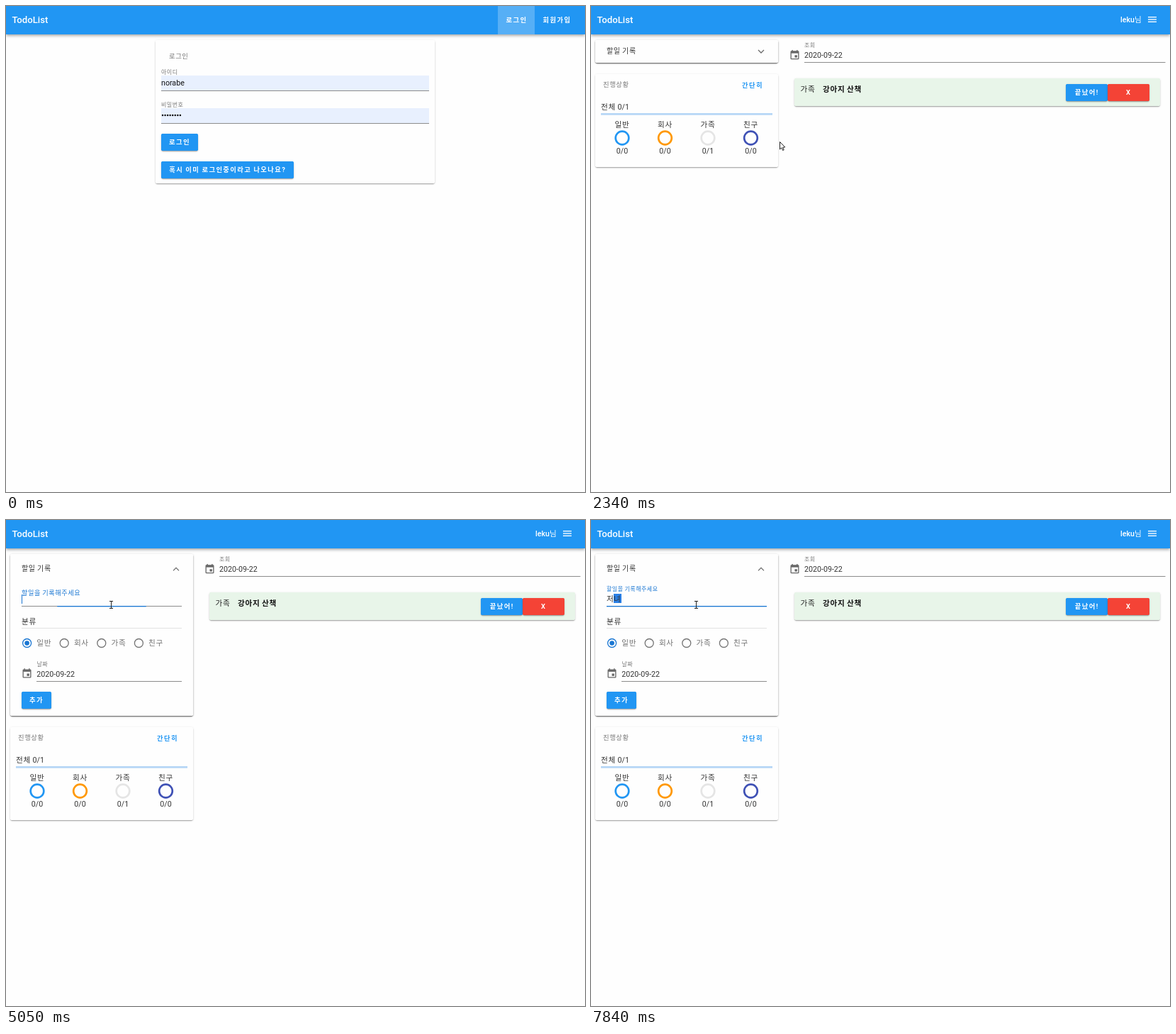
Animation, 817 px wide and 685 px high, one loop 8000 ms. Source, as an HTML page with a canvas:

```html
<!DOCTYPE html>
<html lang="ko">
<head>
<meta charset="utf-8">
<title>TodoList</title>
<style>
  html, body { margin: 0; width: 100%; height: 100%; overflow: hidden; background: #fefefe; }
  canvas { display: block; }
</style>
</head>
<body>
<canvas id="stage" width="817" height="685"></canvas>
<script>
const ctx = document.getElementById('stage').getContext('2d');
const LOOP = 8000;
const BLUE = '#2196f3', DEEP = '#1976d2', INK = '#333', GRAY = '#777', LINE = '#8c8c8c', PAPER = '#fefefe';
const BODY = 10.67, SMALL = 8, CAPTION = 9.33;

const HOME_AT = 1960, OPEN_AT = 4333, FOCUS_AT = 4980;

const pointerPath = [
  [70, 783, 672], [300, 640, 400], [500, 480, 180], [620, 400, 105], [780, 366, 172],
  [1010, 366, 172], [1250, 288, 182], [1400, 255, 188], [1800, 248, 190], [1960, 248, 190],
  [2340, 266, 191], [2500, 266, 191], [2980, 401, 294], [3140, 401, 294], [3340, 591, 262],
  [3600, 380, 180], [3780, 205, 146], [3940, 156, 134], [4250, 130, 77], [4650, 130, 77],
  [4810, 140, 98], [5000, 148, 119]
];

// time, committed text, syllable being composed
const typing = [
  [0, '', ''], [6280, 'wj', ''], [6430, 'wjs', ''], [6510, 'wjsu', ''], [6740, 'wjs', ''],
  [6900, 'wj', ''], [6980, 'w', ''], [7060, '', ''], [7300, '', 'ㅈ'], [7450, '', '저'],
  [7600, '', '전'], [7760, '저', '녀']
];

const categories = [['일반', BLUE], ['회사', '#ff9800'], ['가족', '#e5e5e5'], ['친구', '#3f51b5']];

const clamp01 = v => Math.min(1, Math.max(0, v));
const easeOut = v => 1 - (1 - clamp01(v)) ** 3;
const mix = (a, b, k) => a + (b - a) * k;

function rect(x, y, w, h, color) {
  ctx.fillStyle = color;
  ctx.fillRect(x, y, w, h);
}

function roundRect(x, y, w, h, r) {
  ctx.beginPath();
  ctx.roundRect(x, y, w, h, r);
}

const LOW = [[1, 1, -.4, .3], [1.3, 1.3, 0, .14], [.7, 3.3, 0, .12]];
const DOUBLE = [...LOW, ...LOW];
const HIGH = [[1.3, 2.7, -.7, .2], [2.7, 3.3, 0, .14], [.7, 6.7, 0, .12]];

// Filled box on whole pixels with layered shadows: [offset, blur, spread, alpha]
function surface(x, y, w, h, color = PAPER, r = 2.7, shadows = LOW) {
  const bottom = Math.round(y + h);
  y = Math.round(y);
  h = bottom - y;
  ctx.fillStyle = color;
  for (const [dy, blur, spread, alpha] of shadows) {
    ctx.save();
    ctx.shadowColor = `rgba(0,0,0,${alpha})`;
    ctx.shadowBlur = blur;
    ctx.shadowOffsetY = dy;
    roundRect(x - spread, y - spread, w + 2 * spread, h + 2 * spread, r);
    ctx.fill();
    ctx.restore();
  }
  roundRect(x, y, w, h, r);
  ctx.fill();
}

// Draws text around the vertical centre y; Hangul runs get a slightly wider pitch.
function text(str, x, y, { size = BODY, color = INK, weight = 400, track = 0, center = false } = {}) {
  ctx.font = `${weight} ${size}px Roboto, "Noto Sans CJK KR", sans-serif`;
  ctx.fillStyle = color;
  const runs = str.match(/[ㄱ-힣]+|[^ㄱ-힣]+/g) || [];
  const space = run => { ctx.letterSpacing = `${(/[ㄱ-힣]/.test(run) ? size * .06 : 0) + track}px`; };
  const widths = runs.map(run => { space(run); return ctx.measureText(run).width; });
  const total = widths.reduce((a, b) => a + b, 0);
  const baseline = Math.round(y + size * .36);
  let left = center ? x - total / 2 : x;
  runs.forEach((run, i) => {
    space(run);
    ctx.fillText(run, left, baseline);
    left += widths[i];
  });
  return total;
}

function label(str, x, y, size = SMALL, color = GRAY) {
  text(str, x, y, { size, color });
}

function buttonText(str, x, y, color = '#fff') {
  text(str, x, y, { size: CAPTION, color, weight: 700, track: .83, center: true });
}

function button(str, x, y, w, color = BLUE) {
  surface(x, y, w, 24, color);
  buttonText(str, x + w / 2, y + 12);
}

function circle(x, y, r, color, width) {
  ctx.beginPath();
  ctx.arc(x, y, r, 0, Math.PI * 2);
  if (width) {
    ctx.strokeStyle = color;
    ctx.lineWidth = width;
    ctx.stroke();
  } else {
    ctx.fillStyle = color;
    ctx.fill();
  }
}

function polyline(points, color, width) {
  ctx.beginPath();
  points.forEach(([x, y]) => ctx.lineTo(x, y));
  ctx.strokeStyle = color;
  ctx.lineWidth = width;
  ctx.stroke();
}

function calendar(x, y) {
  const color = '#666';
  ctx.strokeStyle = color;
  ctx.lineWidth = 1.33;
  roundRect(x - 5.33, y - 5.33, 10.67, 10.67, .7);
  ctx.stroke();
  rect(x - 5.33, y - 5.33, 10.67, 2.67, color);
  for (const dx of [-4, 2.67]) rect(x + dx, y - 7.33, 1.33, 2, color);
  rect(x, y, 3.33, 3.33, color);
}

function appBar() {
  surface(0, 0, 817, 40, BLUE, 0, HIGH);
  text('TodoList', 8.5, 19.3, { size: 13.2, color: '#fff', weight: 500 });
}

function field(name, y, hovered) {
  label(name, 219, y - 25.5);
  rect(219, y - 21, 378, 21, '#e8f0fe');
  rect(219, y, 378, 1, hovered ? INK : LINE);
}

function loginPage(time, pointer) {
  rect(694, 0, 52, 40, 'rgba(255,255,255,.24)');
  buttonText('로그인', 720.5, 19.5);
  buttonText('회원가입', 777.5, 19.5);

  surface(211, 48, 394, 202);
  label('로그인', 230, 71, CAPTION);
  const over = y => pointer && pointer.x < 597 && pointer.y > y - 21 && pointer.y < y;
  field('아이디', 119, over(119));
  text('norabe', 219, 108.3, { color: '#111' });
  field('비밀번호', 165, over(165));
  for (let i = 0; i < 8; i++) circle(221 + i * 3.55, 154, 1.25, '#111');

  button('로그인', 219, 179.5, 52);
  if (pointer && pointer.kind === 'hand') {
    ctx.save();
    roundRect(219, 180, 52, 24, 2.7);
    ctx.clip();
    rect(219, 180, 52, 24, 'rgba(255,255,255,.08)');
    const k = easeOut((time - 1650) / 300);
    if (k > 0) circle(mix(pointer.x, 245, k), 192, 30 * k, 'rgba(255,255,255,.22)');
    ctx.restore();
  }
  button('혹시 이미 로그인중이라고 나오나요?', 219, 219, 187);
}

function progressCard(top) {
  surface(6, top, 258, 131);
  label('진행상황', 17, top + 15, CAPTION);
  buttonText('간단히', 228, top + 15.5, BLUE);
  text('전체 0/1', 14, top + 46);
  rect(14, top + 55, 242, 2.67, '#b5d6f6');
  categories.forEach(([name, color], i) => {
    const x = 44 + i * 60.5;
    text(name, x, top + 71, { center: true });
    circle(x, top + 90, 9.33, color, 2.67);
    text(name === '가족' ? '0/1' : '0/0', x, top + 108.3, { center: true });
  });
}

function inputField(time) {
  const k = easeOut((time - FOCUS_AT) / 300);
  label('할일을 기록해주세요', 22, mix(110, 97, k), mix(BODY, SMALL, k), k > 0 ? DEEP : GRAY);
  rect(22, 121, 226, 1, LINE);
  rect(135 - 113 * k, 121, 226 * k, 1.33, DEEP);
  if (!k) return;

  const [, done, composing] = typing.filter(step => step[0] <= time).pop();
  const end = Math.round(22 + text(done, 22, 111));
  if (composing) {
    rect(end, 104, 11, 13, '#2a80e6');
    text(composing, end, 111);
  } else if (time < 5510 || time >= 5970) {
    rect(end, 105, 1, 13, DEEP);
  }
}

function todoForm(time) {
  inputField(time);
  text('분류', 22, 143);
  rect(22, 152, 226, 1, '#e2e2e2');
  categories.forEach(([name], i) => {
    const x = 29.6 + i * 52.6;
    circle(x, 173.5, 6, i ? '#757575' : DEEP, 1.33);
    if (!i) circle(x, 173.5, 3.3, DEEP);
    label(name, x + 13.7, 173, BODY, '#707070');
  });
  calendar(29.5, 216.5);
  label('날짜', 43.5, 202.7);
  text('2020-09-22', 43.3, 216.7);
  rect(43, 227, 205, 1, LINE);
  button('추가', 22, 242, 42);
}

function expansionPanel(time, open) {
  const height = Math.round(32 + 196 * open), shift = 10.67 * open;
  surface(6, 48, 258, height, PAPER, 2.7, DOUBLE);
  text('할일 기록', 22, 63.3 + shift / 2, { size: 10 });

  ctx.save();
  ctx.translate(240, 64 + shift / 2);
  ctx.rotate(Math.PI * open);
  polyline([[-4, -2], [0, 2], [4, -2]], '#6a6a6a', 1.25);
  ctx.restore();

  if (!open) return;
  ctx.save();
  ctx.beginPath();
  ctx.rect(6, 80 + shift, 258, height - 32 - shift);
  ctx.clip();
  ctx.translate(0, Math.round(shift - 10.67));
  todoForm(time);
  ctx.restore();
}

function homePage(time) {
  const open = easeOut((time - OPEN_AT) / 300);
  text('leku님', 747, 19, { color: '#fff', weight: 500 });
  for (let i = 0; i < 3; i++) rect(786, 15 + i * 3.33, 12, 1.33, '#fff');

  expansionPanel(time, open);
  progressCard(Math.round(96 + 196 * open));

  calendar(287.5, 69.3);
  label('조회', 301, 55);
  text('2020-09-22', 301, 69);
  rect(301, 79, 509.5, 1, LINE);

  surface(287, 102, 516, 39, '#e8f5e9');
  text('가족', 295.5, 117.3, { color: '#222' });
  text('강아지 산책', 327, 117.3, { color: '#111', weight: 700 });
  button('끝났어!', 670, 110, 59);
  button('X', 729, 110, 59, '#f44336');
}

function pointerAt(time) {
  if (time < pointerPath[0][0]) return null;
  let i = pointerPath.findIndex(key => key[0] > time);
  if (i < 0) i = pointerPath.length;
  const [t0, x0, y0] = pointerPath[i - 1];
  const [t1, x1, y1] = pointerPath[i] || [t0 + 1, x0, y0];
  const k = clamp01((time - t0) / (t1 - t0));
  const x = mix(x0, x1, k), y = mix(y0, y1, k);

  let kind = 'arrow';
  if (time < HOME_AT) {
    if (x < 271 && y > 180 && y < 204) kind = 'hand';
    else if (x < 597 && ((y > 98 && y < 119) || (y > 144 && y < 165))) kind = 'beam';
  } else if (x < 264) {
    const open = time > OPEN_AT;
    if (y < (open ? 91 : 80)) kind = 'hand';
    else if (open && y < 122) kind = 'beam';
  }
  return { x, y, kind };
}

const ARROW = [[.5, .5], [.5, 11], [2.9, 8.8], [4.6, 12.5], [6.2, 11.8], [4.6, 8.2], [7.8, 8]];
const HAND = [[-1, .5], [0, -.5], [1, .5], [1, 4.6], [4.6, 5.4], [5.8, 6.6], [5.8, 10],
  [4.4, 14], [-1.2, 14], [-4.3, 9], [-3.6, 7.6], [-1, 9]];

function drawPointer({ x, y, kind }) {
  ctx.save();
  ctx.translate(Math.round(x), Math.round(y));
  if (kind === 'beam') {
    rect(0, -5, 1, 11, '#222');
    for (const end of [-5, 5]) {
      rect(-2, end, 2, 1, '#222');
      rect(1, end, 2, 1, '#222');
    }
  } else {
    ctx.beginPath();
    (kind === 'hand' ? HAND : ARROW).forEach(([px, py]) => ctx.lineTo(px, py));
    ctx.closePath();
    ctx.lineJoin = 'round';
    ctx.lineWidth = 1;
    ctx.fillStyle = '#fff';
    ctx.strokeStyle = '#222';
    ctx.fill();
    ctx.stroke();
    if (kind === 'hand') polyline([[1, 4.6], [1, 7.5]], '#222', .8);
  }
  ctx.restore();
}

function draw(now) {
  const time = now % LOOP;
  const pointer = pointerAt(time);
  rect(0, 0, 817, 685, PAPER);
  appBar();
  if (time < HOME_AT) loginPage(time, pointer);
  else homePage(time);
  if (pointer) drawPointer(pointer);
}

const start = performance.now();
function tick() {
  draw(performance.now() - start);
  requestAnimationFrame(tick);
}
tick();
</script>
</body>
</html>
```
